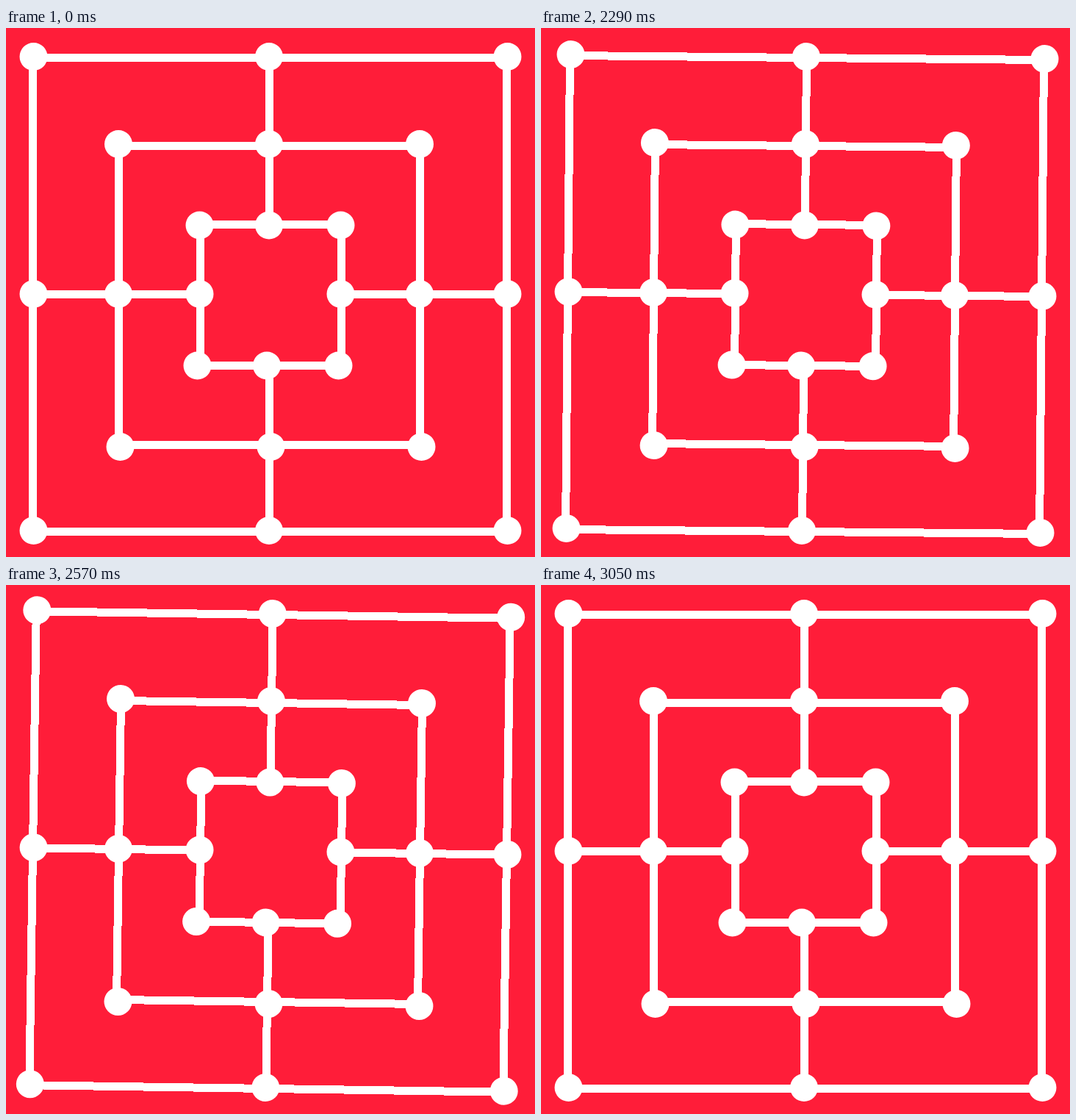
An HTML page with a canvas that plays this animation: 720 px wide and 720 px high, repeating every 3.09 s.

```html
<!DOCTYPE html>
<html lang="en">
<head>
<meta charset="utf-8">
<title>Shaking board</title>
<style>
  html, body { margin: 0; width: 100%; height: 100%; overflow: hidden; background: #ff1d39; }
  canvas { display: block; }
</style>
</head>
<body>
<canvas id="stage" width="720" height="720"></canvas>
<script>
const SIZE = 720, LOOP = 3090, STEP = 40, FIRST_STEP = 10;
const SHAKE_START = 2041, KEY_GAP = 100;
const ANGLES = [0, 2, 2, -1, 0, 2, -2, 0.1, 1, -1, 0]; // degrees, linear between keys
const PIVOT = { x: 360, y: 363 };
const MIDDLE = { x: 358.5, y: 362.5 };
const RED = '#ff1d39', LINE = 11, RADIUS = 19;

// Each ring's dots sit a little off its lines: sideways by dx, its top and
// bottom rows by up and down, and the bottom row leans sideways once more.
const RINGS = [
  { left: 36.5, top: 40.5, right: 681.5, bottom: 685.5, dx: 1, up: -1.5, down: -1.5, lean: 0 },
  { left: 153.5, top: 160.5, right: 563.5, bottom: 567.5, dx: -0.5, up: -2.5, down: 2.5, lean: 2.5 },
  { left: 264.5, top: 267.5, right: 456.5, bottom: 459.5, dx: -1, up: 1, down: 0, lean: -3 }
];

function makeLines() {
  const layer = document.createElement('canvas');
  layer.width = layer.height = SIZE;
  const g = layer.getContext('2d');
  const [outer, , inner] = RINGS;
  g.strokeStyle = '#fff';
  g.lineWidth = LINE;
  for (const { left, top, right, bottom } of RINGS) g.rect(left, top, right - left, bottom - top);
  for (const side of ['top', 'bottom']) {
    g.moveTo(MIDDLE.x, outer[side]);
    g.lineTo(MIDDLE.x, inner[side]);
  }
  for (const side of ['left', 'right']) {
    g.moveTo(outer[side], MIDDLE.y);
    g.lineTo(inner[side], MIDDLE.y);
  }
  g.stroke();
  return layer;
}

// A dot on every corner and every side's middle
function makeDots() {
  const dots = new Path2D();
  const add = (x, y) => {
    dots.moveTo(x + RADIUS, y);
    dots.arc(x, y, RADIUS, 0, Math.PI * 2);
  };
  for (const { left, top, right, bottom, dx, up, down, lean } of RINGS) {
    for (const x of [left + dx, MIDDLE.x - 0.5, right + dx]) {
      add(x, top + up);
      add(x + lean, bottom + down);
    }
    add(left + dx, MIDDLE.y - 0.5);
    add(right + dx, MIDDLE.y - 0.5);
  }
  return dots;
}

function angleAt(time) {
  const t = Math.floor((time - FIRST_STEP) / STEP) * STEP + FIRST_STEP;
  const u = (t - SHAKE_START) / KEY_GAP;
  if (u <= 0 || u >= ANGLES.length - 1) return 0;
  const i = Math.floor(u);
  return ANGLES[i] + (ANGLES[i + 1] - ANGLES[i]) * (u - i);
}

const ctx = document.getElementById('stage').getContext('2d');
const lines = makeLines(), dots = makeDots();

function draw() {
  ctx.resetTransform();
  ctx.fillStyle = RED;
  ctx.fillRect(0, 0, SIZE, SIZE);
  ctx.translate(PIVOT.x, PIVOT.y);
  ctx.rotate(angleAt(performance.now() % LOOP) * Math.PI / 180);
  ctx.translate(-PIVOT.x, -PIVOT.y);
  ctx.imageSmoothingEnabled = false; // tilted lines break into whole-pixel steps
  ctx.drawImage(lines, 0, 0);
  ctx.fillStyle = '#fff';
  ctx.fill(dots);
  requestAnimationFrame(draw);
}
draw();
</script>
</body>
</html>
```
